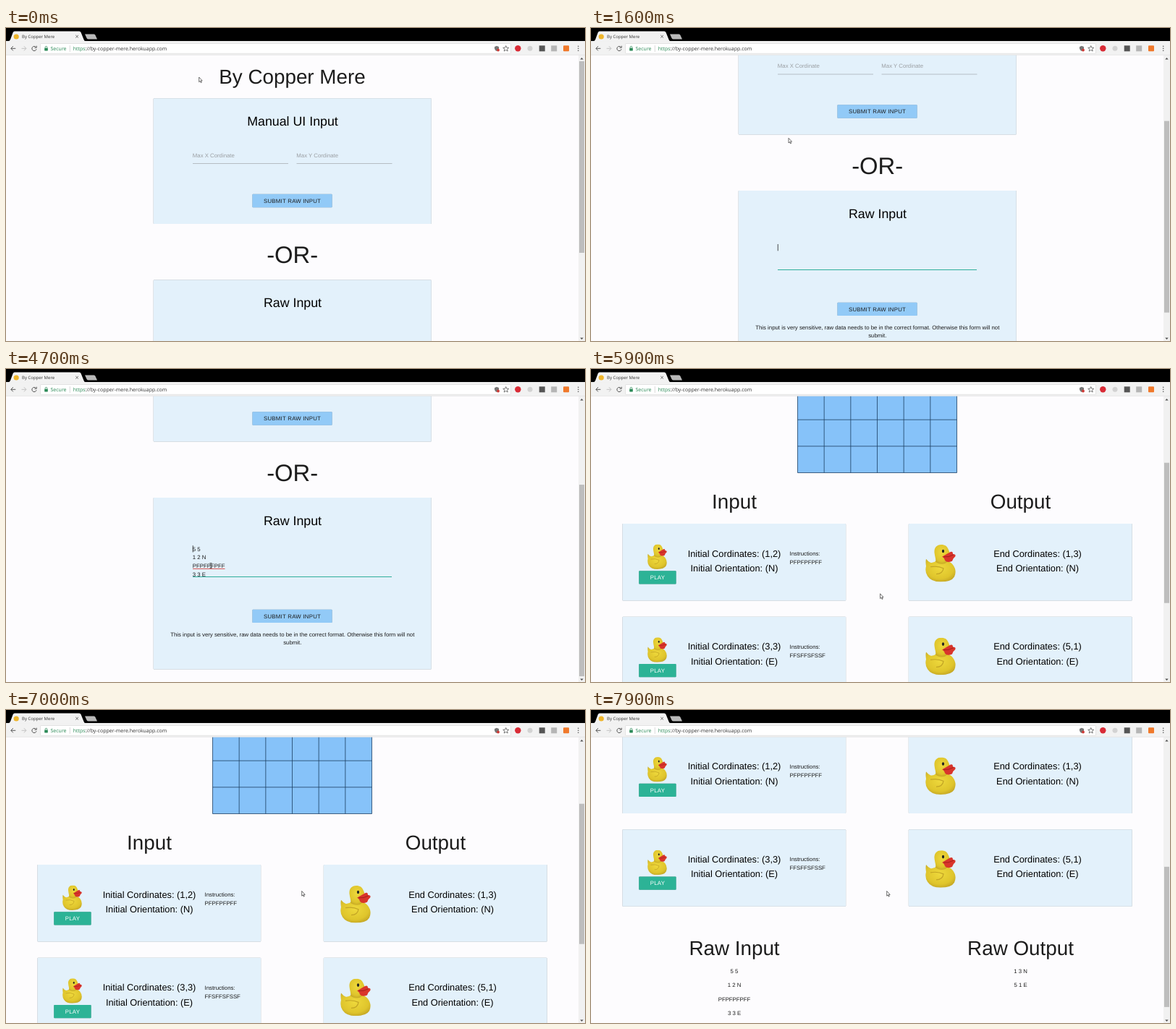
An HTML page that plays this animation: 800 by 433 pixels, repeating every 8000 ms.

```html
<!DOCTYPE html>
<html lang="en">
<head>
<meta charset="utf-8">
<title>By Copper Mere</title>
<style>
  html, body { margin: 0; width: 100%; height: 100%; overflow: hidden; background: #fdfcfe; }
  svg { display: block; }
  #stage { width: 800px; height: 433px; }
  text {
    font: 7.81px "Liberation Sans", Arial, sans-serif;
    fill: #1c1c1c;
    white-space: pre;
    text-rendering: geometricPrecision;
  }
  .mid { text-anchor: middle; }
  .h1 { font-size: 32.8px; }
  .h2 { font-size: 27.8px; }
  .h4 { font-size: 17.8px; fill: #000; }
  .h5 { font-size: 12.8px; fill: #000; }
  .hint { fill: #9b9fa3; }
  .btn-text { letter-spacing: .26px; }
  .white { fill: #fff; }
  .card { fill: #e3f1fb; filter: drop-shadow(0 .8px .6px rgba(0, 0, 0, .4)); }
  .btn { fill: #92caf7; filter: drop-shadow(0 .8px .6px rgba(0, 0, 0, .35)); }
  .play { fill: #2cb396; }
  .ui { font: 7px "Open Sans", "Noto Sans", sans-serif; fill: #333; }
  .tab { font-size: 6px; }
  .green { fill: #2b8a57; }
  .line { fill: none; stroke: #555; stroke-width: 1; }
</style>
</head>
<body>
<svg id="stage" viewBox="0 0 800 433">
  <defs>
    <radialGradient id="skin" cx=".48" cy=".4" r=".7">
      <stop offset="0" stop-color="#eed83c"/>
      <stop offset=".65" stop-color="#dfc52c"/>
      <stop offset="1" stop-color="#b99a22"/>
    </radialGradient>
    <symbol id="duck" viewBox="0 0 42 52" preserveAspectRatio="none">
      <path d="M1 20Q0 24 1 30Q-1 38 3 44Q8 52 21 52Q36 52 40 45Q44 36 38 28Q34 23 28 23L16 22Q11 26 7 25Q4 24 1 20Z" fill="url(#skin)"/>
      <path d="M22 0C15 0 12 5 12.500 11C13 17 15 20 14 24C19 28 27 28 30 24C34 19 35 13 32 7C30 2 27 0 22 0Z" fill="url(#skin)"/>
      <path d="M7 31Q17 29 25 33Q24 41 15 41" fill="none" stroke="#c3a525" stroke-width="1.200"/>
      <path d="M23 17Q28 14 33 11Q38 8 38 13Q43 13 41 17Q38 19 37 23Q30 26 27 22Q26 18 23 17Z" fill="#d9352b"/>
      <path d="M25 17Q32 18 39 14" fill="none" stroke="#a51f1c"/>
      <ellipse cx="24.500" cy="9" rx="1.600" ry="2.300" fill="#222"/>
    </symbol>
  </defs>

  <rect width="800" height="433" fill="#fdfcfe"/>

  <g id="form">
    <text class="h2 mid" x="395.5" y="76.5">By Copper Mere</text>
    <rect class="card" x="203.7" y="97.2" width="384" height="173.8" rx="1"/>
    <text class="h4 mid" x="396" y="135">Manual UI Input</text>
    <text class="hint" x="257.8" y="178.7">Max X Cordinate</text>
    <text class="hint" x="401.3" y="178.7">Max Y Cordinate</text>
    <path d="M258 187.5h132M401.5 187.5h132" stroke="#a3a8ac" stroke-width=".7"/>
    <rect class="btn" x="340.4" y="229.8" width="110.2" height="18.4" rx="1"/>
    <text class="btn-text" x="356" y="241.8">SUBMIT RAW INPUT</text>

    <text class="h1 mid" x="395.7" y="325">-OR-</text>

    <rect class="card" x="203.7" y="348.6" width="384" height="237.4" rx="1"/>
    <text class="h4 mid" x="396" y="386.3">Raw Input</text>
    <rect x="258" y="457.5" width="275" height="1" fill="#2fae9b"/>
    <g id="pasted">
      <text x="257.8" y="422">5 5</text>
      <text x="257.8" y="433.7">1 2 N</text>
      <text x="257.8" y="445.4">PFPFPFPFF</text>
      <text x="257.8" y="457.1">3 3 E</text>
      <path d="M258 446.9h44.5" stroke="#d8453f" stroke-width=".9"/>
    </g>
    <rect id="caret" x="257.8" width=".8" height="9.3" fill="#222"/>
    <rect class="btn" x="340.4" y="503.2" width="110.2" height="18.4" rx="1"/>
    <text class="btn-text" x="356" y="515">SUBMIT RAW INPUT</text>
    <text class="mid" x="395.8" y="540.2">This input is very sensitive, raw data needs to be in the correct format. Otherwise this form will not</text>
    <text class="mid" x="395.8" y="551.9">submit.</text>
  </g>

  <g id="result">
    <rect x="285.5" y="94" width="220" height="220" fill="#86c2f9"/>
    <path id="grid" fill="none" stroke="#1d3f62" stroke-width=".8"/>
    <text class="h2 mid" x="198" y="363.5">Input</text>
    <text class="h2 mid" x="593.5" y="363.5">Output</text>
    <g id="rows"></g>
    <text class="h2 mid" x="198" y="687">Raw Input</text>
    <text class="h2 mid" x="593.5" y="687">Raw Output</text>
    <text class="mid" x="198" y="711.7">5 5</text>
    <text class="mid" x="198" y="731.2">1 2 N</text>
    <text class="mid" x="198" y="750.7">PFPFPFPFF</text>
    <text class="mid" x="198" y="770.3">3 3 E</text>
    <text class="mid" x="593.5" y="711.7">1 3 N</text>
    <text class="mid" x="593.5" y="731.2">5 1 E</text>
  </g>

  <g id="scrollbar">
    <rect x="791" y="37" width="9" height="396" fill="#f1f1f1"/>
    <path d="M793.3 43.5l2.2-2.5 2.2 2.5zM793.3 428.5l2.2 2.5 2.2-2.5z" fill="#505050"/>
    <rect id="thumb" x="792" width="7" fill="#bdbdbd"/>
  </g>

  <g id="browser">
    <rect width="800" height="19" fill="#000"/>
    <rect y="18" width="800" height="19.5" fill="#f2f2f2"/>
    <path d="M3 18.5Q5 18 6 16L9.5 6.5Q10.3 4.5 12 4.5H101Q103 4.5 103.7 6.500L107.500 16Q108.300 18 110 18.500Z" fill="#f2f2f2"/>
    <path d="M109 8.5H121.5Q123 8.5 123.5 10L126 15.5H114Q112.3 15.5 111.5 14Z" fill="#b9b9b9"/>
    <circle cx="14.2" cy="12" r="3.6" fill="#eeb52c"/>
    <text class="ui tab" x="22" y="14">By Copper Mere</text>
    <path d="M96.2 9.8l3.8 3.8M100 9.8l-3.8 3.8" stroke="#555" stroke-width=".8"/>
    <path class="line" d="M13.3 28.3H7M9.8 25.2L6.8 28.3L9.8 31.4"/>
    <path class="line" d="M21.5 28.3H27.7M24.9 25.2L27.9 28.3L24.9 31.4" style="stroke:#c2c2c2"/>
    <path class="line" d="M41.3 26.4A3.1 3.1 0 1 0 42 29.2M42.2 24.7V27.2H39.5"/>
    <path d="M0 37.3H800" stroke="#d8d8d8" stroke-width=".5"/>
    <rect x="47.5" y="21.5" width="650" height="13.8" rx="1" fill="#fff" stroke="#d5d5d5" stroke-width=".6"/>
    <rect x="53.2" y="27.7" width="4.6" height="3.8" rx=".4" fill="#2b8a57"/>
    <path d="M54.2 28v-1.4a1.3 1.3 0 0 1 2.6 0V28" fill="none" stroke="#2b8a57" stroke-width=".8"/>
    <text class="ui green" x="61.5" y="31">Secure</text>
    <path d="M88.3 24v9" stroke="#ccc" stroke-width=".7"/>
    <text class="ui" x="92.8" y="31"><tspan class="green">https</tspan>://by-copper-mere.herokuapp.com</text>
    <path d="M675 26l3-1.2 3 1.2v2.6q-.5 2.3-3 3.4q-2.5-1.1-3-3.4z" fill="#777"/>
    <circle cx="680" cy="30.5" r="1.9" fill="#cf3b37"/>
    <path d="M690.7 24.5l1.1 2.6 2.9.2-2.2 1.9.7 2.8-2.5-1.5-2.5 1.5.7-2.8-2.2-1.9 2.9-.2z" fill="none" stroke="#555" stroke-width=".8"/>
    <circle cx="707.3" cy="28.3" r="4.2" fill="#d92b36"/>
    <circle cx="724" cy="28.3" r="3.5" fill="#d3d3d3"/>
    <rect x="736.7" y="24.3" width="8" height="8" fill="#555"/>
    <rect x="753.2" y="24.3" width="8" height="8" fill="#b5b5b5"/>
    <rect x="770" y="24.3" width="8" height="8" rx="1" fill="#f0792b"/>
    <g fill="#555"><circle cx="790.7" cy="25.3" r=".8"/><circle cx="790.7" cy="28.3" r=".8"/><circle cx="790.7" cy="31.3" r=".8"/></g>
  </g>

  <path id="arrow" d="M0 0V6.7L1.5 5.3L2.6 7.7L3.6 7.2L2.6 4.9H4.5Z" fill="#fff" stroke="#333" stroke-width=".7"/>
  <path id="ibeam" d="M-1.6-3.3H1.6M0-3.3V3.3M-1.6 3.3H1.6" fill="none" stroke="#333" stroke-width=".8"/>
</svg>
<script>
const LOOP = 8000, STEP = 100;
const PASTE = 4200, SUBMIT = 5600;
const BLINK = 530, BLINK_START = 240;
const $ = id => document.getElementById(id);

// Points are [time, value, ...]; values run linearly between them.
// The scroll position carries over from the form to the result page.
const scroll = [
  [1300, 0], [1600, 123.5], [1800, 162], [1900, 170.5],
  [7100, 170.5], [7500, 213], [7900, 348]
];
const pointer = [
  [200, 266.7, 68], [1000, 273, 152.3], [1900, 273, 152.3], [2400, 266.8, 262],
  [4600, 266.8, 262], [4700, 283, 272], [5300, 395, 341], [5700, 395, 341], [6300, 408.7, 250.5]
];

function at(points, t) {
  const next = points.findIndex(p => p[0] > t);
  if (next === 0) return points[0].slice(1);
  if (next < 0) return points[points.length - 1].slice(1);
  const a = points[next - 1], b = points[next];
  const k = (t - a[0]) / (b[0] - a[0]);
  return a.slice(1).map((v, i) => v + (b[i + 1] - v) * k);
}

function row(y, start, facing, steps, end) {
  return `<g transform="translate(0 ${y})">
    <rect class="card" x="43.4" width="308.8" height="106.5" rx="1"/>
    <use href="#duck" x="78" y="28.5" width="27" height="34.5"/>
    <rect class="btn play" x="66.2" y="65.2" width="51.4" height="18.4" rx="1"/>
    <text class="btn-text white mid" x="92" y="77.2">PLAY</text>
    <text class="h5 mid" x="198" y="45.7">Initial Cordinates: (${start})</text>
    <text class="h5 mid" x="198" y="66.2">Initial Orientation: (${facing})</text>
    <text x="274.5" y="44.3">Instructions:</text>
    <text x="274.5" y="56">${steps}</text>
    <rect class="card" x="438.8" width="308.8" height="106.5" rx="1"/>
    <use href="#duck" x="462" y="29" width="42" height="51.5"/>
    <text class="h5 mid" x="617" y="45.7">End Cordinates: (${end})</text>
    <text class="h5 mid" x="617" y="66.2">End Orientation: (${facing})</text>
  </g>`;
}

$('rows').innerHTML =
  row(384.5, '1,2', 'N', 'PFPFPFPFF', '1,3') +
  row(513.2, '3,3', 'E', 'FFSFFSFSSF', '5,1');

let lines = '';
for (let i = 0; i <= 6; i++) {
  const d = i * 220 / 6;
  lines += `M${285.5 + d} 94v220M285.5 ${94 + d}h220`;
}
$('grid').setAttribute('d', lines);

const show = (id, on) => $(id).style.display = on ? '' : 'none';
const move = (id, x, y) => $(id).setAttribute('transform', `translate(${x} ${y})`);

function draw(t) {
  const done = t >= SUBMIT, pasted = t >= PASTE;
  const [y] = at(scroll, t);
  show('form', !done);
  show('result', done);
  move(done ? 'result' : 'form', 0, -y);

  $('thumb').setAttribute('y', 46 + y * (done ? .491 : .669));
  $('thumb').setAttribute('height', done ? 194 : 265);

  show('pasted', pasted);
  show('caret', t >= BLINK_START && Math.floor((t - BLINK_START) / BLINK) % 2 === 0);
  $('caret').setAttribute('y', pasted ? 414.7 : 422.5);

  const [px, py] = at(pointer, t);
  const overField = !done && py + y > 410 && py + y < 462;
  show('arrow', !overField);
  show('ibeam', overField);
  move(overField ? 'ibeam' : 'arrow', px, py);
}

function tick() {
  draw(Math.floor(performance.now() % LOOP / STEP) * STEP);
  requestAnimationFrame(tick);
}
tick();
</script>
</body>
</html>
```
